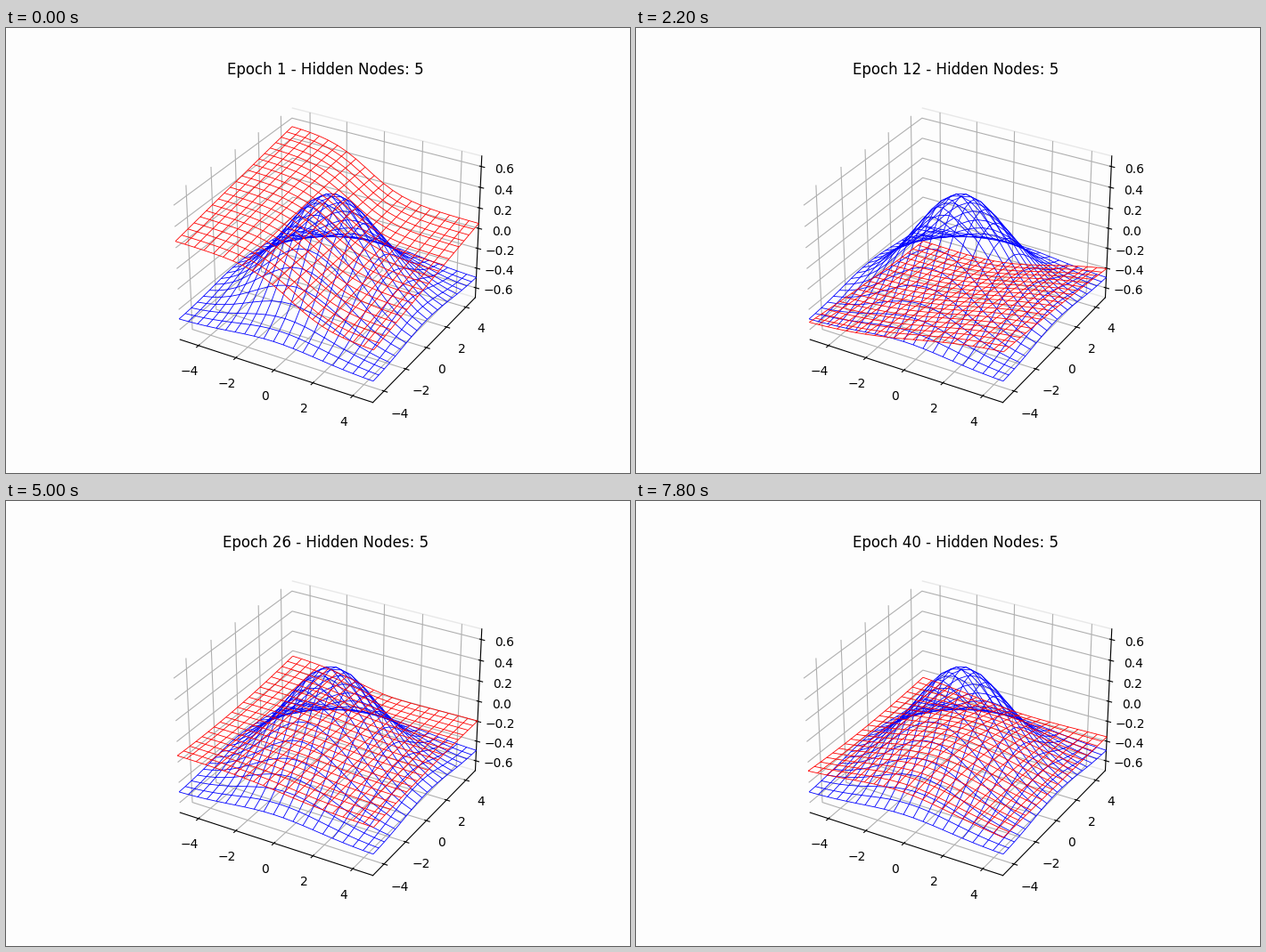
Recreate the animation shown at these times as a matplotlib script. Size 700 px wide and 500 px high, loop 8000 ms.

```python
import numpy as np
import matplotlib.pyplot as plt
from matplotlib.animation import FuncAnimation

BG = "#fdfdfd"
EPOCHS = 40

axis = np.arange(-5, 5.5, 0.5)
X, Y = np.meshgrid(axis, axis)
bell = np.exp(-0.1 * X**2) * np.exp(-0.1 * Y**2) - 0.5

# Heights on a 3 x 3 net (rows y = -5, 0, 5), then steepness and skew in x.
start = np.array([.26, .035, -.20, .39, .165, -.07, .52, .285, .05, .5, .17])
fall = np.array([-.406, -.345, -.237, -.43, -.40, -.26, -.45, -.467, -.311, .25, .02])
low = np.array([-.442, -.345, -.212, -.50, -.42, -.27, -.535, -.53, -.356, .25, .02])
rise = np.array([-.206, -.225, -.227, -.22, -.23, -.22, -.228, -.315, -.248, .35, .03])
high = np.array([-.136, -.182, -.237, -.13, -.15, -.20, -.053, -.18, -.196, .4, .06])
bend = np.array([-.206, -.21, -.311, -.19, -.15, -.25, -.108, -.25, -.221, .32, .04])
settle = np.array([-.284, -.20, -.336, -.31, -.17, -.34, -.274, -.36, -.356, .25, .02])

times = np.array([1, 7, 9, 12, 16, 22, 26, 32, 40])
keys = np.array([start, start + 0.6 * (fall - start), fall,
                 low + 0.12 * (low - start), low, rise, high, bend, settle])
slopes = np.zeros_like(keys)
slopes[1:-1] = (keys[2:] - keys[:-2]) / (times[2:] - times[:-2])[:, None]


def params(epoch):
    """Cubic Hermite curve through the key shapes."""
    i = min(np.searchsorted(times, epoch, side="right") - 1, len(times) - 2)
    h = times[i + 1] - times[i]
    u = (epoch - times[i]) / h
    return ((2 * u**3 - 3 * u**2 + 1) * keys[i]
            + (u**3 - 2 * u**2 + u) * h * slopes[i]
            + (3 * u**2 - 2 * u**3) * keys[i + 1]
            + (u**3 - u**2) * h * slopes[i + 1])


def quadratic(t):
    return np.array([t * (t - 1) / 2, 1 - t**2, t * (t + 1) / 2])


def estimate(epoch):
    p = params(epoch)
    net, steep, skew = p[:9].reshape(3, 3), p[9], p[10]
    s = np.tanh(steep * (X + skew * Y)) / np.tanh(5 * steep)
    return np.einsum("iab,ij,jab->ab", quadratic(Y / 5), net, quadratic(s))


def mesh_lines(Z):
    grid = np.stack([X, Y, Z], axis=-1)
    return list(grid) + list(grid.transpose(1, 0, 2))


fig = plt.figure(figsize=(7, 5), dpi=100, facecolor=BG)
ax = fig.add_subplot(projection="3d", facecolor=BG)
ax.set_xlim(-5, 5)
ax.set_ylim(-5, 5)
ax.set_zlim(-0.7, 0.7)
for side in (ax.xaxis, ax.zaxis):
    side.set_pane_color((1, 1, 1, 0))
ax.yaxis.pane.set(facecolor="none", edgecolor="#e8e8e8", alpha=None)

ax.plot_wireframe(X, Y, bell, color="blue", linewidth=0.6, rstride=1, cstride=1)
wire = ax.plot_wireframe(X, Y, estimate(1), color="red", linewidth=0.6,
                         rstride=1, cstride=1)
title = ax.set_title("")


def draw(frame):
    epoch = frame + 1
    wire.set_segments(mesh_lines(estimate(epoch)))
    title.set_text(f"Epoch {epoch} - Hidden Nodes: 5")
    return wire, title


anim = FuncAnimation(fig, draw, frames=EPOCHS, interval=200,
                     init_func=lambda: draw(0), repeat=True, repeat_delay=0)
plt.show()
```
